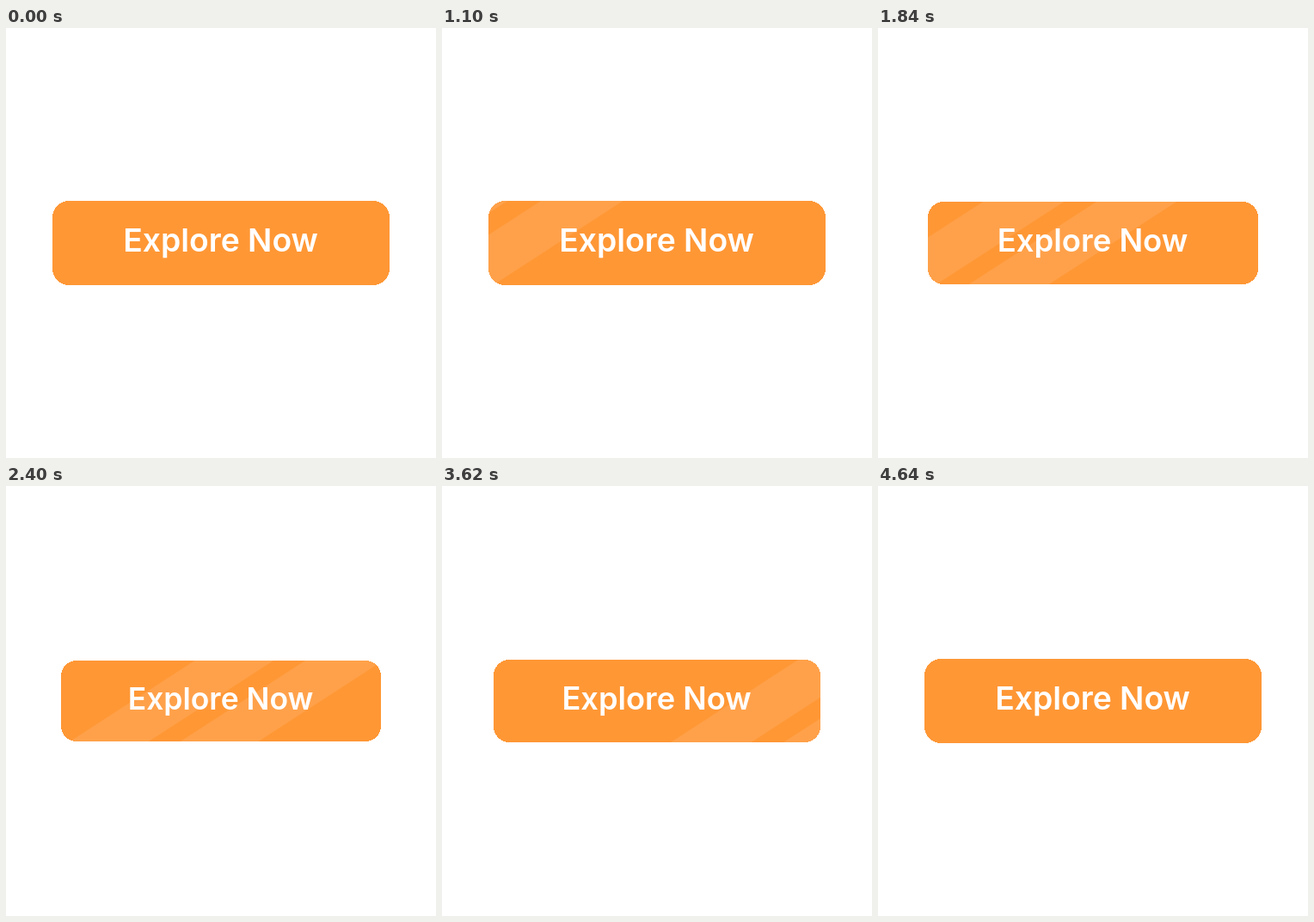
Animation of 500 by 500 pixels, one loop 5.5 s. Source, as an HTML page with a canvas:

```html
<!DOCTYPE html>
<html lang="en">
<head>
<meta charset="utf-8">
<title>Explore Now</title>
<style>
  html, body { margin: 0; width: 100%; height: 100%; overflow: hidden; background: #fff; }
  canvas { display: block; width: 100vmin; height: 100vmin; }
</style>
</head>
<body>
<canvas id="stage" width="500" height="500"></canvas>
<script>
const ctx = document.getElementById('stage').getContext('2d');
const LOOP = 5500;
const LAST_STEP = 100;
const CENTER = 250;
const HALF_W = 196;
const HALF_H = 49;
const RADIUS = 19;
const SLANT = 1.54;

// Three uneven steps (20, 100 and 20 ms) make up each 140 ms.
function stepAt(ms) {
  const rest = ms % 140;
  const part = rest < 20 ? 0 : rest < 120 ? 1 : 2;
  return Math.min(LAST_STEP, 3 * Math.floor(ms / 140) + part);
}

function ease(u) {
  const t = Math.min(1, Math.max(0, u));
  return (1 - Math.cos(Math.PI * t)) / 2;
}

function buttonScale(step) {
  const press = step < 60 ? ease((step - 24) / 36) : ease((95 - step) / 35);
  return 1 - 0.055 * press;
}

function shineX(step) {
  const d = step - 56;
  return -16 + 8.15 * d - 0.004 * d ** 2 - 0.0001 * d ** 3;
}

// Filled in whole pixel rows, which keeps the outline hard-edged.
function drawButton(scale) {
  const halfW = Math.round(HALF_W * scale);
  const halfH = Math.round(HALF_H * scale);
  const radius = RADIUS * scale;
  ctx.fillStyle = '#ff9735';
  for (let y = -halfH; y < halfH; y++) {
    const intoCorner = Math.max(0, Math.abs(y + 0.5) - (halfH - radius));
    const inset = Math.round(radius - Math.sqrt(radius ** 2 - intoCorner ** 2));
    const half = halfW - inset;
    ctx.fillRect(CENTER - half, CENTER + y, 2 * half, 1);
  }
}

function band(left, width) {
  const reach = HALF_H + 1;
  const lean = reach * SLANT;
  const middle = left + HALF_H * SLANT;
  ctx.beginPath();
  ctx.moveTo(middle - lean, reach);
  ctx.lineTo(middle + lean, -reach);
  ctx.lineTo(middle + lean + width, -reach);
  ctx.lineTo(middle - lean + width, reach);
  ctx.fill();
}

function drawShine(step) {
  const x = shineX(step);
  ctx.globalCompositeOperation = 'source-atop';
  ctx.fillStyle = 'rgba(255, 255, 255, 0.1)';
  band(x, 95);
  band(x - 135, 96);
}

function drawLabel() {
  ctx.fillStyle = '#fff';
  ctx.font = '600 37.3px Inter, sans-serif';
  ctx.textAlign = 'center';
  ctx.fillText('Explore Now', -0.5, 10);
}

function draw(step) {
  const scale = buttonScale(step);
  ctx.clearRect(0, 0, 500, 500);
  drawButton(scale);
  ctx.save();
  ctx.translate(CENTER, CENTER);
  ctx.scale(scale, scale);
  if (step > 0 && step < LAST_STEP) drawShine(step);
  drawLabel();
  ctx.restore();
}

const start = performance.now();

function tick() {
  draw(stepAt((performance.now() - start) % LOOP));
  requestAnimationFrame(tick);
}
tick();
</script>
</body>
</html>
```
